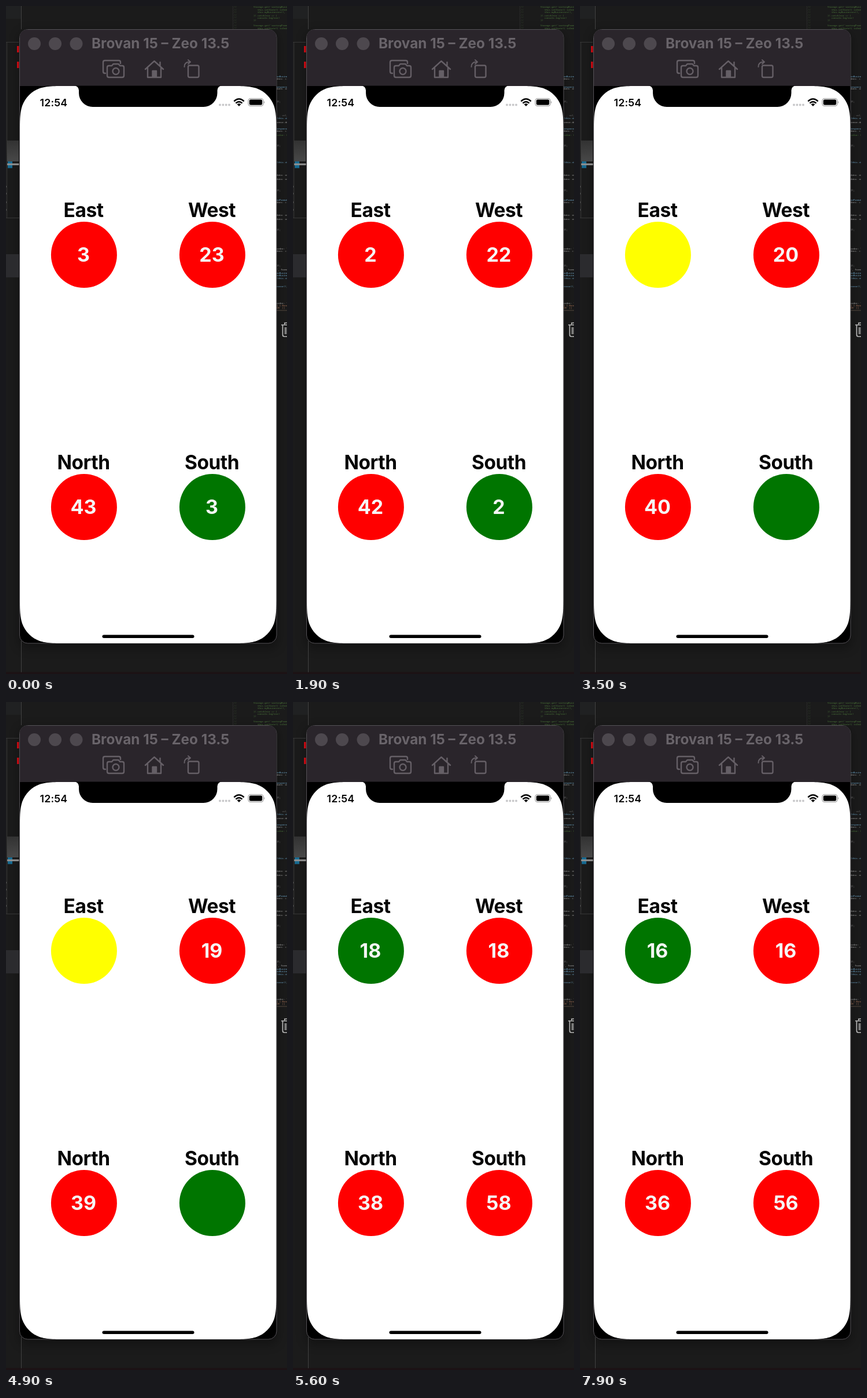
Write an HTML page that moves like this. It is 486 px wide and 1152 px high and loops after 8 s.

```html
<!DOCTYPE html>
<html lang="en">
<head>
<meta charset="utf-8">
<title>Traffic signals</title>
<style>
  html, body { margin: 0; width: 100%; height: 100%; overflow: hidden; background: #1a1a1a; }
  svg { display: block; width: 100%; height: 100%; }
  text { font-family: Inter, Roboto, sans-serif; font-weight: 700; }
  .code text { font: 4px "Noto Sans Mono", "DejaVu Sans Mono", monospace; white-space: pre; }
  .icon { fill: none; stroke: #655f66; stroke-width: 2.4; stroke-linejoin: round; stroke-linecap: round; }
  .label { font-size: 33.5px; letter-spacing: -.5px; text-anchor: middle; fill: #050505; }
  .count { font-size: 34px; text-anchor: middle; fill: #f6f6f6; }
  .clock { font-size: 17.8px; font-weight: 600; letter-spacing: .15px; fill: #050505; }
</style>
</head>
<body>
<svg id="stage" viewBox="0 0 486 1152" preserveAspectRatio="none">
  <defs>
    <linearGradient id="thumb" x2="0" y2="1">
      <stop stop-color="#323232"/><stop offset="1" stop-color="#484848"/>
    </linearGradient>
    <filter id="soft" x="-20%" y="-10%" width="140%" height="120%"><feGaussianBlur stdDeviation="9"/></filter>
    <clipPath id="window"><rect x="23.5" y="40.5" width="444.500" height="1058.5" rx="14"/></clipPath>
  </defs>

  <rect width="486" height="1152" fill="#1b1b1b"/>
  <rect width="26" height="22" fill="#202122"/>
  <rect y="1148.5" width="486" height="3.5" fill="#1c1215"/>
  <rect x="22" y="44" width="448" height="1064" rx="14" fill="#000" opacity=".3" filter="url(#soft)"/>
  <path d="M26.5 0V40M26.5 1095V1149" stroke="#414141"/>
  <path d="M0 62.5H22M1.5 62V365M0 365.5H24" fill="none" stroke="#363636"/>
  <path d="M19 69h3.500v11h-3.500zM19 96h3.500v11h-3.500z" fill="#c40a12"/>
  <rect x="2" y="232" width="20" height="36" fill="url(#thumb)"/>
  <path d="M3 268h8v11.500h-8z" fill="#176a91"/>
  <rect x="2" y="271.500" width="20.500" height="3" fill="#929292"/>
  <path d="M0 310v3M0 322v3M0 337v3M0 350v3" stroke="#777"/>
  <rect y="428" width="22.500" height="40" fill="#2b2b2e"/>

  <g class="code" id="code"></g>
  <path d="M392.5 0V40" stroke="#292929"/>
  <path d="M467 525H486" stroke="#4b4138" stroke-width="1.2"/>
  <path d="M476 550H490M478.5 550V567Q478.5 570 481.5 570H490M482 549V546.5H490M483 554V566M486 554V566"
    fill="none" stroke="#b8b8b8" stroke-width="1.7"/>

  <rect x="23.5" y="40.5" width="444.500" height="1058.5" rx="14" fill="#000" stroke="#555257"/>
  <g clip-path="url(#window)">
    <rect x="24" y="41" width="443.500" height="97" fill="#2a252b"/>
    <path id="screen" fill="#fff"/>
    <path d="M118 137.500A8 8 0 0 1 126 145.500V150A24 24 0 0 0 150 174H341.500A24 24 0 0 0 365.500 150V145.500A8 8 0 0 1 373.500 137.500Z"/>
  </g>

  <g fill="#4d484e">
    <circle cx="49" cy="65" r="11"/><circle cx="85" cy="65" r="11"/><circle cx="121.500" cy="65" r="11"/>
  </g>
  <text x="148" y="73" font-size="24.300" fill="#69646a">Brovan 15 – Zeo 13.5</text>

  <g class="icon">
    <path d="M172 116H171Q168 116 168 113V97Q168 94 171 94H195Q198 94 198 97V99"/>
    <path d="M178 103H183L185.500 100H194.500L197 103H201Q204 103 204 106V120Q204 123 201 123H178Q175 123 175 120V106Q175 103 178 103Z"/>
    <circle cx="190" cy="112.500" r="5.500"/>
    <path d="M241 109L256.500 95L272 109M245 106.500V123H268V106.500M266.500 103V97"/>
    <path d="M253.500 112H260V122H253.500Z" fill="#655f66"/>
    <rect x="315" y="102.500" width="18.500" height="20.500" rx="2.500"/>
    <path d="M308.500 105Q308.500 96.500 317 96.500M315 93L319 96.500L315 100" stroke-width="2"/>
  </g>

  <text class="clock" x="58.500" y="172.500">12:54</text>
  <g fill="#c7c7c9">
    <circle cx="370" cy="170.500" r="1.900"/><circle cx="375.400" cy="170.500" r="1.900"/>
    <circle cx="380.700" cy="170.500" r="1.900"/><circle cx="386" cy="170.500" r="1.900"/>
  </g>
  <path d="M394.300 164.300Q403 156.200 411.700 164.300M397.400 167.600Q403 162.600 408.600 167.600"
    fill="none" stroke="#050505" stroke-width="2.500"/>
  <path d="M399.600 169.600Q403 166.800 406.400 169.600L403 173Z" fill="#050505"/>
  <rect x="419" y="159.500" width="26" height="13" rx="4" fill="#fff" stroke="#929292" stroke-width="1.100"/>
  <rect x="420.800" y="161.200" width="22.400" height="9.600" rx="2.400"/>
  <path d="M446.300 163.700Q448.500 166 446.300 168.300Z" fill="#929292"/>

  <g id="signals"></g>
  <rect x="166.500" y="1084.500" width="159" height="5.500" rx="2.750"/>
</svg>
<script>
const NS = "http://www.w3.org/2000/svg";
const byId = id => document.getElementById(id);

function add(parent, tag, attrs, text = "") {
  const el = document.createElementNS(NS, tag);
  for (const key in attrs) el.setAttribute(key, attrs[key]);
  el.textContent = text;
  parent.append(el);
  return el;
}

// Continuous corner as [along, across] points in units of the radius.
const half = [[1.529, 0], [1.088, 0], [.868, 0], [.631, .075], [.373, .169]];
const corner = [...half, ...half.map(([a, b]) => [b, a]).reverse()];

function screenPath(l, t, r, b, radius) {
  const trace = (x, y, sx, sy, flip) => {
    const pts = corner.map(([a, c]) => flip ? [c, a] : [a, c])
      .map(([a, c]) => `${x + sx * a * radius} ${y + sy * c * radius}`);
    return `L${pts[0]}C${pts.slice(1)}`;
  };
  return `M${(l + r) / 2} ${t}` + trace(r, t, -1, 1, false) + trace(r, b, -1, -1, true) +
    trace(l, b, 1, -1, false) + trace(l, t, 1, 1, true) + "Z";
}
byId("screen").setAttribute("d", screenPath(24, 138, 467.5, 1099, 54));

const code = byId("code");
const green = "#4d7a3c", blue = "#6ea6c9", pale = "#a5a5a5", tan = "#a97358";
const line = (x, y, text, fill) => add(code, "text", { x, y, fill }, text);

[
  [428, 3, "Storage.get('sortingBusiness')"],
  [435, 7.5, "this.setState({ isOrder: res"],
  [435, 12, "this.myBusinesses();"],
  [428, 17.5, "}).catch(err => {"],
  [435, 22, "console.log(err)"],
  [428, 26, "})"],
  [428, 35, "Storage.get('sortingPromotion')"],
  [435, 39.5, "this.setState({ isOrder"]
].forEach(([x, y, text]) => line(x, y, text, green));
for (let y = 3; y < 40; y += 4.5) line(394, y, "//", "#3c5335");

[
  [pale, "});", [166, 242, 319, 387, 449]],
  [blue, "onBusiness", [123, 462, 466]],
  [pale, "data: respo", [144, 293, 300, 362, 369]],
  [blue, "response.da", [141, 213]],
  [blue, "(this.state", [195, 271, 471]],
  [pale, "ders: = [", [127, 217, 340, 424]],
  [pale, "sense.data", [202]],
  [green, "color: folde", [224]],
  [blue, "onPromotion", [336]],
  [pale, "order: 'DE", [420, 514]],
  [tan, "[ 1.0and", [518]],
  [tan, "OR' }]", [522]],
  [pale, "', format", [456]],
  [blue, "error();", [485]],
  ["#696969", "  ; url, ;", [190]]
].forEach(([fill, text, rows]) => rows.forEach(y => line(468, y, text, fill)));

const RED = "#ff0000", GREEN = "#007500", YELLOW = "#ffff00";

// Each signal returns its colour and count after k ticks.
const signals = [
  { name: "East", x: 134.9, y: 429,
    at: k => k < 3 ? [RED, 3 - k] : k < 5 ? [YELLOW, ""] : [GREEN, 23 - k] },
  { name: "West", x: 356.9, y: 429, at: k => [RED, 23 - k] },
  { name: "North", x: 134.9, y: 864, at: k => [RED, 43 - k] },
  { name: "South", x: 356.9, y: 864,
    at: k => k < 3 ? [GREEN, 3 - k] : k < 5 ? [GREEN, ""] : [RED, 63 - k] }
];
for (const s of signals) {
  const group = add(byId("signals"), "g", {});
  add(group, "text", { class: "label", x: s.x - .9, y: s.y - 65 }, s.name);
  s.disc = add(group, "circle", { cx: s.x, cy: s.y, r: 57 });
  s.count = add(group, "text", { class: "count", x: s.x - .9, y: s.y + 12 });
}

const LOOP = 8000, TICK = 1000, LEAD = 50;
function draw(ms) {
  const ticks = Math.min(7, Math.floor((ms % LOOP + LEAD) / TICK));
  for (const s of signals) {
    const [fill, count] = s.at(ticks);
    s.disc.setAttribute("fill", fill);
    s.count.textContent = count;
  }
}

const start = performance.now();
function frame() {
  draw(performance.now() - start);
  requestAnimationFrame(frame);
}
frame();
</script>
</body>
</html>
```
